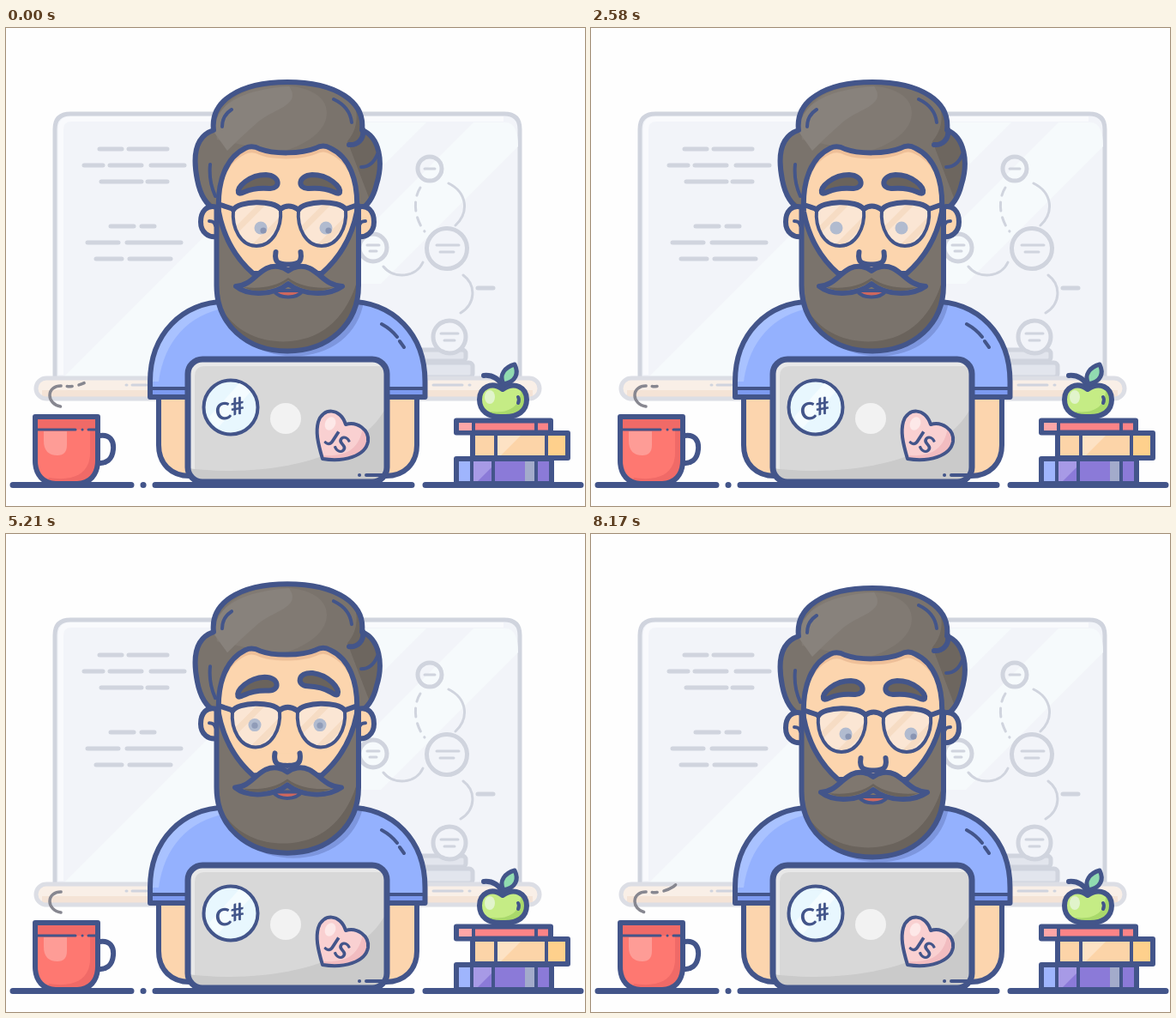
These frames come from a looping animation (675 by 557 pixels, 8.21 s). An HTML page:

```html
<!DOCTYPE html>
<html lang="en">
<head>
<meta charset="utf-8">
<title>Developer at a laptop</title>
<style>
  html, body { margin: 0; width: 100%; height: 100%; overflow: hidden; background: #fefefe; }
  svg { display: block; width: 100vw; height: 100vh; }
  .ink { stroke: #43558a; stroke-width: 6; stroke-linecap: round; stroke-linejoin: round; fill: none; }
  .thin { stroke-width: 4; }
  .fill { stroke: none; }
  .board { stroke: #d0d4de; stroke-width: 5; stroke-linecap: round; stroke-linejoin: round; fill: none; }
  .fine { stroke-width: 3; }
  .steam { stroke: #878790; stroke-width: 3.5; stroke-linecap: round; fill: none; }
  text { font: bold 28px Lato, "Liberation Sans", sans-serif; fill: #43558a; text-anchor: middle; }
</style>
</head>
<body>
<svg viewBox="0 0 675 557">
  <defs>
    <path id="skin" d="M248 214C246 176 258 150 279 140Q287 136 296 141C312 147 344 147 361 140Q370 135 378 140C400 150 411 177 409 214C404 240 392 265 368 286H288C264 265 253 240 248 214Z"/>
    <path id="beard" d="M245.5 206V300C245.5 345 280 376.5 328 376.5S411 345 411 300V206Z"/>
    <path id="shirt" d="M168 430V412C168 358 204 318.5 260 318.5H397C453 318.5 488.5 358 488.5 412V430Z"/>
    <path id="hair" d="M242 119C238 86 271 63 328 63S419 86 415 119C436 127 440 157 432 182C428 199 421 208 411 213H245C233 206 226 193 223 177C217 147 221 126 242 119Z"/>
    <path id="lens" d="M264 212C270 201 311 200 319 211C321 234 309 254 291 254S262 234 264 212Z"/>
    <path id="mug" d="M34 453H107V504C107 521 97 531 83 531H58C44 531 34 521 34 504Z"/>
    <path id="apple" d="M579 421C566 411 552 419 552 433C552 446 562 454 579 453C597 454 607 446 607 433C607 419 593 411 579 421Z"/>
    <path id="heart" d="M369 502C363 482 361 470 364 459C369 442 390 442 396 462C409 458 424 468 422 482C419 499 394 506 369 502Z"/>
    <clipPath id="inSkin"><use href="#skin"/></clipPath>
    <clipPath id="inBeard"><use href="#beard"/></clipPath>
    <clipPath id="inShirt"><use href="#shirt"/></clipPath>
    <clipPath id="inHair"><use href="#hair"/></clipPath>
    <clipPath id="inLens"><use href="#lens"/></clipPath>
    <clipPath id="inMug"><use href="#mug"/></clipPath>
    <clipPath id="inApple"><use href="#apple"/></clipPath>
    <clipPath id="inHeart"><use href="#heart"/></clipPath>
    <clipPath id="inLid"><rect x="212" y="386" width="232" height="143" rx="17"/></clipPath>
  </defs>

  <!-- whiteboard -->
  <path class="board" style="fill:#f2f4f9" d="M57 408V118Q57 100 75 100H581Q599 100 599 118V408"/>
  <path fill="#f6fafc" d="M66 408L364 110H490L192 408ZM357 298L545 110H582Q597 110 597 138L437 298Z"/>
  <path stroke="#f9fafd" stroke-width="6" fill="none" d="M64 404V118Q64 106 76 106H580"/>
  <g class="board">
    <path d="M109 141H135M143 141H188M91 160H113M121 160H158M169 160H208M111 179H158M165 179H188M122 231H149M158 231H173M95 250H131M141 250H204M105 269H135M144 269H192M550 303H568"/>
    <circle cx="494" cy="164" r="14"/><circle cx="514" cy="257" r="23.5"/><circle cx="428" cy="256" r="16"/>
    <g style="fill:#e2e5ed">
      <rect x="470" y="375" width="66" height="13" rx="4"/>
      <rect x="470" y="390" width="74" height="17" rx="4"/>
    </g>
    <circle cx="517" cy="360" r="19" style="fill:#f2f4f9"/>
    <path class="fine" d="M488 164H500M502 253H528M506 261H522M421 253H435M424 260H432M507 356H527M511 364H523M516 181C538 192 540 215 524 230M440 278C452 293 478 291 486 273M533 288C548 299 548 321 530 332"/>
    <path class="fine" stroke-dasharray="10 8" d="M483 186C474 200 476 222 488 237"/>
  </g>
  <rect x="35" y="408" width="587" height="24" rx="12" fill="#f9efe7"/>
  <path d="M42 426H614" stroke="#f4e3d6" stroke-width="8"/>
  <rect class="board" x="35" y="408" width="587" height="24" rx="12" style="stroke:#dcdee5"/>
  <path class="board fine" d="M140 416H141M147 416H164M498 416H532M540 416H541"/>

  <path class="steam"/><path class="steam"/>

  <!-- body -->
  <g class="ink">
    <path style="fill:#fcd5ae" d="M178 428V486C178 508 193 522 214 522H443C464 522 479 508 479 486V428Z"/>
    <use href="#shirt" fill="#94b1fe" class="fill"/>
    <g clip-path="url(#inShirt)" class="fill">
      <path fill="#a9c2ff" d="M168 412C168 360 206 318 262 318V325C215 332 185 362 178 412Z"/>
      <path fill="#7d9af0" d="M168 421H489V431H168Z"/>
      <g class="lift"><use href="#beard" x="7" y="6" fill="#7d96de"/></g>
    </g>
    <use href="#shirt"/>
    <path class="thin" d="M169 420H210M447 420H487M438 345Q449 351 456 360M459 365L464 372"/>
  </g>

  <!-- head -->
  <g class="ink lift">
    <use href="#hair" class="fill" fill="#7a736c"/>
    <g clip-path="url(#inHair)" class="fill">
      <path fill="#6d665f" d="M392 70C412 84 414 114 398 132L430 216H450V60ZM220 165C225 190 232 200 250 212L245 225H215Z"/>
      <path fill="#817a73" d="M246 130C240 92 270 68 318 67C350 67 374 78 374 99C374 124 340 140 318 145L285 138Z"/>
      <path fill="#88827c" d="M243 122C242 92 270 72 330 68C346 91 310 94 291 112Q277 124 258 143Z"/>
    </g>
    <use href="#hair"/>
    <path d="M416 118C418 130 409 137 400 136"/>
    <path class="thin" d="M263 95Q252 102 252 115M382 83Q401 92 403 110M433 147Q427 162 414 162M238 159Q236 178 244 196"/>
    <g id="ear">
      <path style="fill:#fcd5ae" d="M246 209C234 205 227 214 227 226S236 245 247 243Z"/>
      <path class="thin" d="M237 225Q243 225 244 230"/>
    </g>
    <use href="#ear" transform="translate(656) scale(-1 1)"/>

    <use href="#beard" class="fill" fill="#7a736c"/>
    <path clip-path="url(#inBeard)" class="fill" fill="#6a635c" d="M245 312C259 354 298 368 332 365C372 361 400 335 412 285V385H245Z"/>
    <path d="M245.5 210V300C245.5 345 280 376.5 328 376.5S411 345 411 300V210"/>
    <use href="#skin" class="fill" fill="#eebf98"/>
    <g clip-path="url(#inSkin)" class="fill"><use href="#skin" y="7" fill="#fcd5ae"/></g>
    <use href="#skin"/>

    <g id="face">
      <path class="thin" style="fill:#cf675d" d="M311 306C318 316 338 316 345 306Z"/>
      <path style="fill:#7f776f" d="M328 283C322 278 312 276 303 280C289 287 284 300 267 301C282 313 312 311 328 298C344 311 374 313 391 301C372 300 367 287 353 280C344 276 334 278 328 283Z"/>
      <path class="fill" fill="#6a635c" d="M276 302C295 304 313 302 328 291C343 302 362 304 381 302C362 310 343 306 328 294C313 306 290 310 276 302Z"/>
      <path style="fill:#fcd5ae" d="M313.5 261C311 276 320 275 328 275.5C336 275 345 276 342.5 261"/>

      <g id="eye">
        <use href="#lens" class="fill" fill="#fbe6d4"/>
        <g clip-path="url(#inLens)" class="fill">
          <path fill="#f6dcc4" d="M258 240L304 194H314L258 250ZM280 258L330 208V219L291 258Z"/>
          <g class="iris"><circle cx="290" cy="233" r="7.5" fill="#b1bbcf"/><circle class="pupil" cx="290" cy="233" r="3.6" fill="#8995b3"/></g>
        </g>
        <use href="#lens" class="thin"/>
        <path d="M264 212C270 201 311 200 319 211"/>
      </g>
      <use href="#eye" x="76"/>
      <path d="M319 211Q328 204 339 211M264 211L249 206M395 211L409 206"/>
      <g id="browL">
        <path id="brow" style="fill:#6a635c" d="M270 192C268 185 283 171 302 171C320 172 319 188 306 187C295 186 286 187 277 191Q271 194 270 192Z"/>
      </g>
      <g id="browR"><use href="#brow" transform="translate(658) scale(-1 1)"/></g>
    </g>
  </g>

  <!-- laptop -->
  <g clip-path="url(#inLid)">
    <path fill="#d8d8d8" d="M210 384H446V531H210Z"/>
    <path fill="#e8e8e8" d="M215 389H441V394H232Q220 394 220 406V520H215Z"/>
    <path fill="#cacaca" d="M212 513C300 524 413 505 444 440V530H212Z"/>
  </g>
  <rect class="ink" x="212" y="386" width="232" height="143" rx="17" style="stroke-width:7"/>
  <path class="ink thin" d="M412 521H412.1M420 521H440"/>
  <circle cx="326" cy="455" r="18" fill="#f2f2f2"/>
  <circle class="ink thin" cx="262" cy="442" r="31.5" style="fill:#e8f7fe"/>
  <path fill="#f4fcff" d="M237 453L272 414Q280 417 285 424L247 466Q240 462 237 453Z"/>
  <text transform="translate(263 455) rotate(-10)">C<tspan dy="-3">#</tspan></text>
  <use href="#heart" fill="#f9d0d1"/>
  <g clip-path="url(#inHeart)">
    <path fill="#f2bcc0" d="M425 465V510H365L368 498C395 500 412 492 416 465Z"/>
    <ellipse cx="378" cy="461" rx="6" ry="8" fill="#fde8e8" transform="rotate(25 378 461)"/>
  </g>
  <use href="#heart" class="ink thin"/>
  <text transform="translate(381.5 490.5) rotate(33)">JS</text>

  <!-- mug -->
  <path class="ink" d="M109 475C121 473 126 481 125 491C124 503 117 508 106 507"/>
  <use href="#mug" fill="#fe7871"/>
  <g clip-path="url(#inMug)">
    <path fill="#f06a67" d="M34 453H107V468H34ZM98 468H110V535H45L50 524C82 529 98 517 98 495Z"/>
    <path fill="#fe9c96" d="M44 470H71V486Q71 498 60 498Q44 498 44 481Z"/>
  </g>
  <use href="#mug" class="ink"/>
  <path class="ink" style="stroke-width:3" d="M36 468H81M89 468H89.1M96 468H106"/>

  <!-- books and apple -->
  <g class="ink">
    <rect x="525" y="502" width="111" height="29" style="fill:#8b7ad8"/>
    <path class="fill" fill="#9fb5fd" d="M528 505H541V528H528Z"/>
    <path class="fill" fill="#a79ae6" d="M545 505H566V512L550 528H545Z"/>
    <path class="fill" fill="#a3abcb" d="M605 505H618V528H605Z"/>
    <path class="thin" d="M543 504V529M568 504V529M618 504V529"/>
    <rect x="544" y="472" width="111" height="29" style="fill:#fcd4a8"/>
    <path class="fill" fill="#fed08c" d="M632 475H652V498H632Z"/>
    <path class="fill" fill="#fde2c4" d="M573 475H600L577 498H573Z"/>
    <path class="thin" d="M571 474V499M630 474V499"/>
    <rect x="525" y="457.5" width="110" height="14" style="fill:#fb8487"/>
    <path class="fill" fill="#fda6a7" d="M528 460H543V469H528Z"/>
    <path class="thin" d="M545 459V470M618 459V470"/>
    <use href="#apple" class="fill" fill="#c5ec85"/>
    <g clip-path="url(#inApple)" class="fill">
      <path fill="#a9d96b" d="M600 415H610V456H560L565 447C590 450 602 438 600 415Z"/>
      <ellipse cx="564" cy="430" rx="6" ry="8" fill="#e1f4cb"/>
    </g>
    <use href="#apple"/>
    <path d="M579 419C576 409 567 404 557 405"/>
    <path style="fill:#91dbb0;stroke-width:5" d="M580 415C574 404 582 395 593 392C598 402 595 412 580 415Z"/>
    <path class="thin" d="M597 430Q599 433 597 437"/>
  </g>

  <path class="ink" style="stroke-width:7" d="M8 532.5H146M160 532.5H160.1M174 532.5H473M489 532.5H670"/>
</svg>
<script>
const LOOP = 8210, STEAM = 2700;
const all = q => [...document.querySelectorAll(q)];
const byId = id => document.getElementById(id);
const clamp = u => Math.min(1, Math.max(0, u));
const cubic = u => u < .5 ? 4 * u ** 3 : 1 - 4 * (1 - u) ** 3;
const smooth = u => (u = clamp(u), u * u * (3 - 2 * u));
const move = (el, x, y, extra = '') => el.setAttribute('transform', `translate(${x} ${y}) ${extra}`);

// Eased value between [time, value] keys
function track(t, keys) {
  let value = keys[0][1];
  for (let i = 1; i < keys.length; i++) {
    const [t0, a] = keys[i - 1], [t1, b] = keys[i];
    if (t >= t0) value = a + (b - a) * cubic(clamp((t - t0) / (t1 - t0)));
  }
  return value;
}

const steam = all('.steam'), heads = all('.lift'), irises = all('.iris'), pupils = all('.pupil');
const curl = 'M64 441C56 440 51 434 51 428C51 421 57 417 64 417C78 419 88 416 96 411C104 405 108 396 108 386C108 369 96 357 81 357C66 357 55 368 55 382C55 393 64 400 74 400C83 400 90 395 90 388C90 381 85 376 78 376';
steam.forEach(p => p.setAttribute('d', curl));
const total = steam[0].getTotalLength(), hook = 39;
const solid = [[0, hook], [hook + 7, hook + 13], [hook + 21, total]];

// Show only the solid stretches lying between tail and head
function drawSteam(path, phase) {
  const head = total * smooth(phase / STEAM), tail = total * smooth((phase - 850) / 2150);
  const parts = solid.map(([a, b]) => [Math.max(a, tail), Math.min(b, head)]).filter(([a, b]) => b > a);
  path.style.display = parts.length ? '' : 'none';
  if (!parts.length) return;
  const dashes = parts.flatMap(([a, b], i) => [b - a, i + 1 < parts.length ? parts[i + 1][0] - b : 2 * total]);
  path.setAttribute('stroke-dasharray', dashes.join(' '));
  path.setAttribute('stroke-dashoffset', -parts[0][0]);
}

function draw(now) {
  const t = now % LOOP;
  const up = track(t, [[4200, 0], [5800, 1], [7260, 1], [8170, 0]]);
  const face = track(t, [[0, 1], [2500, -1], [2600, -1], [4200, 0], [7260, 0], [8170, 1]]);
  const look = track(t, [[0, 6], [2500, -3], [2600, -3], [4200, 0], [7260, 0], [8170, 6]]);

  heads.forEach(h => move(h, 0, -6 * up));
  move(byId('face'), face, -up);
  irises.forEach(i => move(i, look, -6 * up));
  pupils.forEach(p => {
    move(p, look * .5, 3 * (1 - up));
    p.setAttribute('opacity', clamp(Math.max(up, look / 6)));
  });
  move(byId('browL'), 0, 2 * up, `rotate(${-3 * up} 294 182)`);
  move(byId('browR'), 0, -3 * up, `rotate(${9 * up} 365 182)`);

  const phase = (t + 900) % STEAM;
  drawSteam(steam[0], phase);
  drawSteam(steam[1], phase + STEAM);
}

const start = performance.now();
(function frame() {
  draw(performance.now() - start);
  requestAnimationFrame(frame);
})();
</script>
</body>
</html>
```
